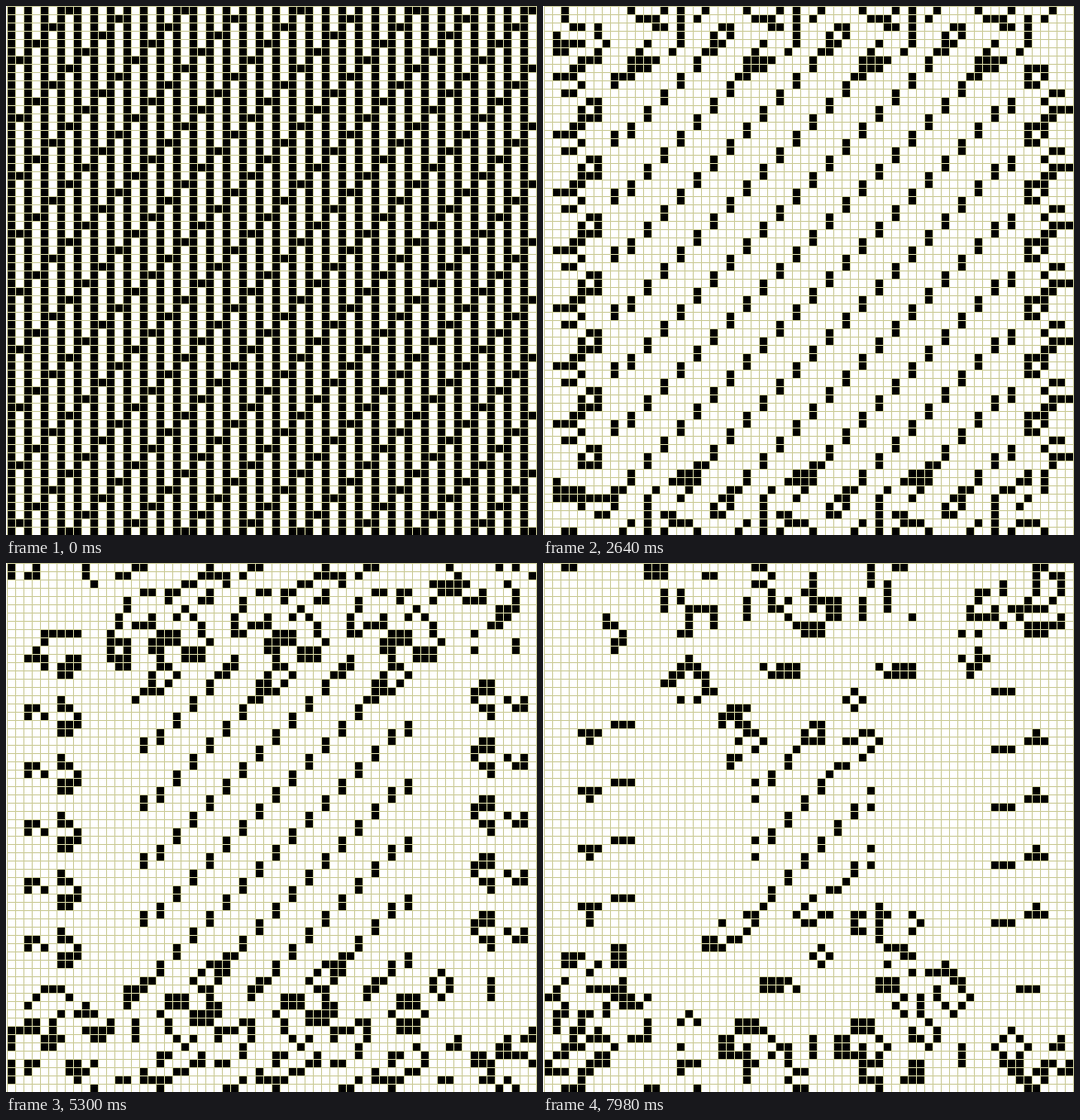
An HTML page with a canvas for the animation above (8000 ms loop, 578 px wide and 576 px high).

```html
<!DOCTYPE html>
<html lang="en">
<head>
<meta charset="utf-8">
<title>Game of Life</title>
<style>
  html, body { margin: 0; width: 100%; height: 100%; overflow: hidden; background: #fff; }
  canvas { display: block; }
</style>
</head>
<body>
<canvas id="stage" width="578" height="576"></canvas>
<script>
const SIZE = 64;
const PITCH = 9;
const LEFT = 1;
const LOOP = 8000;
const GENERATIONS = 27;
const ctx = document.getElementById('stage').getContext('2d');

const wrap = n => (n + SIZE) % SIZE;

function nextGeneration(cells) {
  return cells.map((alive, i) => {
    const row = Math.floor(i / SIZE), col = i % SIZE;
    let neighbours = -alive;
    for (let dr = -1; dr <= 1; dr++)
      for (let dc = -1; dc <= 1; dc++)
        neighbours += cells[wrap(row + dr) * SIZE + wrap(col + dc)];
    return neighbours === 3 || (alive && neighbours === 2) ? 1 : 0;
  });
}

const history = [Array.from({ length: SIZE * SIZE }, (_, i) => i % 2 === 0 || i % 7 === 0 ? 1 : 0)];
while (history.length < GENERATIONS) history.push(nextGeneration(history[history.length - 1]));

// Ticks come in threes: two short ones of 20 ms and a long one of 100 ms.
function tickAt(time) {
  const t = time + 20;
  return 3 * Math.floor(t / 140) + Math.min(2, Math.floor(t % 140 / 20)) - 1;
}

// One generation lasts 20/3 ticks; the first is cut short by 5.
function generationAt(time) {
  return Math.min(GENERATIONS - 1, Math.floor((tickAt(time) + 5) * 3 / 20));
}

function draw(cells) {
  ctx.fillStyle = '#fff';
  ctx.fillRect(0, 0, 578, 576);
  ctx.fillStyle = '#cccc99';
  for (let k = 0; k <= SIZE; k++) {
    ctx.fillRect(LEFT + k * PITCH, 0, 1, 576);
    ctx.fillRect(LEFT, k * PITCH, 577, 1);
  }
  ctx.fillStyle = '#000';
  cells.forEach((alive, i) => {
    if (!alive) return;
    const x = LEFT + 1 + i % SIZE * PITCH;
    const y = 1 + Math.floor(i / SIZE) * PITCH;
    ctx.fillRect(x, y, PITCH - 1, PITCH - 1);
  });
}

const start = performance.now();
let shown = -1;

function render() {
  const generation = generationAt((performance.now() - start) % LOOP);
  if (generation !== shown) draw(history[shown = generation]);
  requestAnimationFrame(render);
}
render();
</script>
</body>
</html>
```
